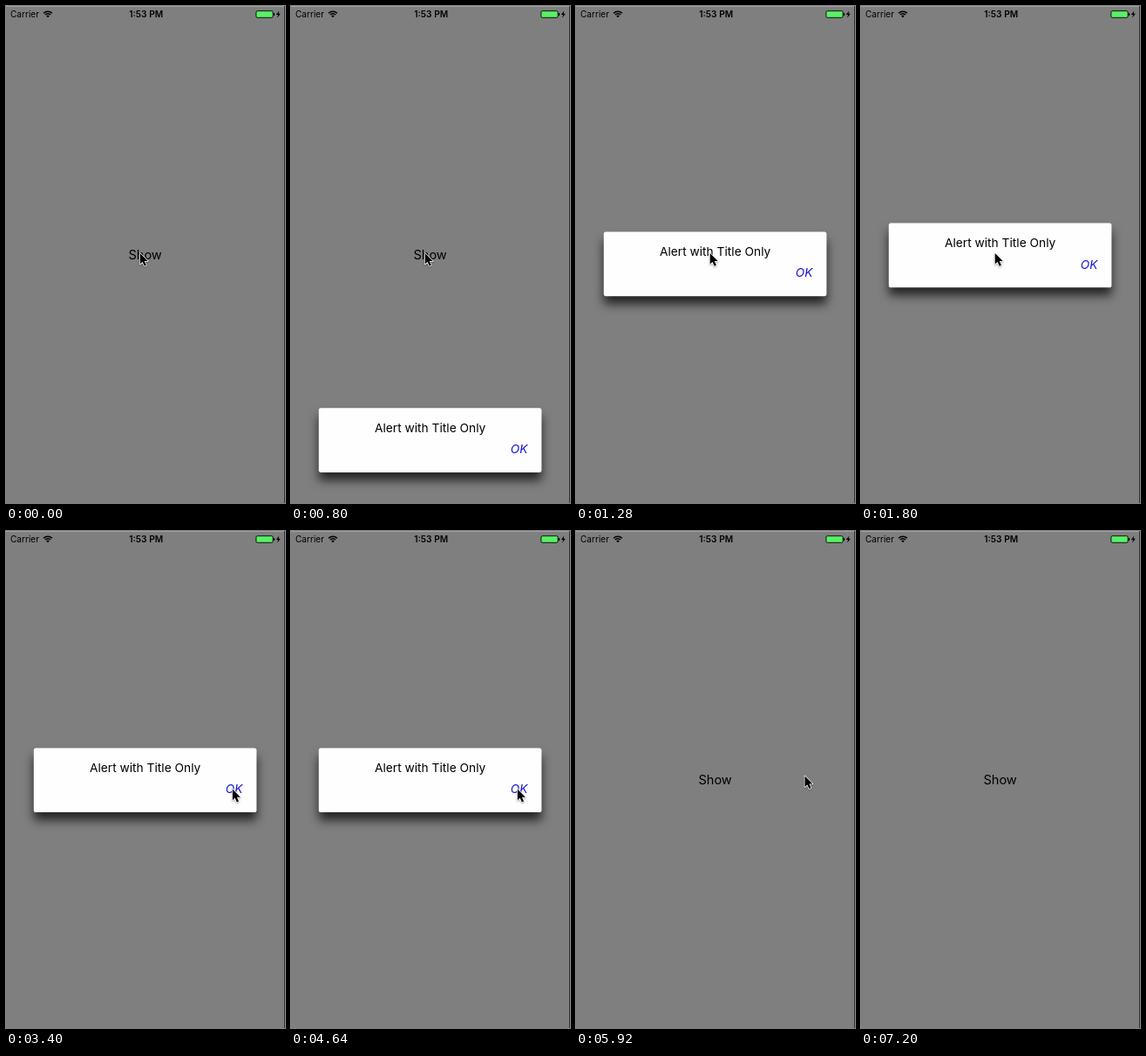
Recreate the animation shown at these times as an HTML page with a canvas. Size 320x569 px, loop 7.88 s.

```html
<!DOCTYPE html>
<html lang="en">
<head>
<meta charset="utf-8">
<title>Alert with Title Only</title>
<style>
  html, body { margin: 0; width: 100%; height: 100%; overflow: hidden; background: #7f7f7f; }
  canvas { display: block; width: 320px; height: 569px; }
</style>
</head>
<body>
<canvas id="stage"></canvas>
<script>
const W = 320, H = 569, LOOP = 7880, TICK = 40;
const canvas = document.getElementById('stage');
const ratio = window.devicePixelRatio || 1;
canvas.width = W * ratio;
canvas.height = H * ratio;
const ctx = canvas.getContext('2d');
ctx.scale(ratio, ratio);

const REST_Y = 248.4;
const clamp = v => Math.min(1, Math.max(0, v));
const progress = (t, from, to) => clamp((t - from) / (to - from));
const smooth = p => p * p * (3 - 2 * p);
const mix = (a, b, p) => a + (b - a) * p;

function text(str, x, y, font, color = '#000', align = 'center') {
  ctx.font = `${font} Inter, sans-serif`;
  ctx.textAlign = align;
  ctx.fillStyle = color;
  ctx.fillText(str, x, y);
}

function polygon(points) {
  ctx.beginPath();
  points.forEach(([x, y]) => ctx.lineTo(x, y));
  ctx.closePath();
}

function roundRect(x, y, w, h, r) {
  ctx.beginPath();
  ctx.roundRect(x, y, w, h, r);
}

function drawStatusBar() {
  text('Carrier', 5, 13.3, '400 10.1px', '#000', 'left');
  text('1:53 PM', 160.7, 13.3, '600 10.2px');

  // Wi-Fi
  ctx.strokeStyle = ctx.fillStyle = '#000';
  ctx.lineWidth = 1.5;
  for (const r of [7, 4.5]) {
    ctx.beginPath();
    ctx.arc(48, 13.2, r, -Math.PI * 0.75, -Math.PI * 0.25);
    ctx.stroke();
  }
  ctx.beginPath();
  ctx.moveTo(48, 13.2);
  ctx.arc(48, 13.2, 2.5, -Math.PI * 0.75, -Math.PI * 0.25);
  ctx.fill();

  // Battery
  ctx.lineWidth = 0.9;
  roundRect(286.9, 5.7, 19.2, 7.6, 1.4);
  ctx.fillStyle = '#5bef67';
  ctx.fill();
  ctx.stroke();
  ctx.fillStyle = '#000';
  roundRect(306.8, 8, 1.3, 3, 0.6);
  ctx.fill();
  polygon([[313.3, 5.5], [309.8, 10], [312, 10], [311.2, 13.4], [314.8, 8.7], [312.6, 8.7]]);
  ctx.fill();
}

function drawAlert(y) {
  ctx.save();
  ctx.shadowColor = 'rgba(0,0,0,0.72)';
  ctx.shadowBlur = 12 * ratio;
  ctx.shadowOffsetY = 9 * ratio;
  ctx.fillStyle = '#fefefe';
  roundRect(31.8, y, 255.6, 73.7, 2.6);
  ctx.fill();
  ctx.restore();
  text('Alert with Title Only', 159.6, y + 27.6, '400 13.75px');
  text('OK', 261.5, y + 52, 'italic 400 13.6px', '#1414d2');
}

function drawCursor({ x, y }) {
  ctx.save();
  ctx.translate(x, y);
  polygon([[0, 0], [0, 12.6], [2.9, 9.9], [5, 14.8], [7.2, 13.8], [5.1, 9.1], [9, 9.1]]);
  ctx.lineJoin = 'round';
  ctx.lineWidth = 1.5;
  ctx.strokeStyle = '#fff';
  ctx.shadowColor = 'rgba(0,0,0,0.35)';
  ctx.shadowBlur = 2 * ratio;
  ctx.shadowOffsetY = ratio;
  ctx.stroke();
  ctx.shadowColor = 'transparent';
  ctx.fillStyle = '#000';
  ctx.fill();
  ctx.restore();
}

function drawClickRing({ x, y }) {
  ctx.beginPath();
  ctx.arc(x + 0.4, y + 1, 18.3, 0, Math.PI * 2);
  ctx.lineWidth = 1.6;
  ctx.strokeStyle = '#111';
  ctx.stroke();
}

// Critically damped rise, then an accelerating drop.
function alertY(t) {
  if (t < 720 || t >= 5080) return null;
  if (t < 4800) {
    const x = 8.37 * (t - 626) / 1000;
    return REST_Y + 370 * (1 + x) * Math.exp(-x);
  }
  const s = (t - 4760) / 1000;
  return REST_Y + 3315 * s * s;
}

function cursorAt(t) {
  if (t >= 6160) return null;
  const across = smooth(progress(t, 2160, 2960));
  const settle = smooth(progress(t, 2960, 3400));
  const leave = progress(t, 5880, 6120) ** 1.6;
  return {
    x: mix(mix(mix(153.7, 251, across), 259.8, settle), 306, leave),
    y: mix(mix(mix(283, 282, across), 295.6, settle), 30, leave)
  };
}

function draw(t) {
  ctx.fillStyle = '#7f7f7f';
  ctx.fillRect(0, 0, W, H);
  ctx.fillStyle = '#a2a2a2';
  ctx.fillRect(0, 0, W, 1);
  ctx.fillStyle = '#333';
  ctx.fillRect(W - 1, 0, 1, H);

  drawStatusBar();
  text('Show', 159.6, 290.2, '400 14.6px');

  const y = alertY(t);
  if (y !== null) drawAlert(y);

  const cursor = cursorAt(t);
  if (!cursor) return;
  const pressed = (t >= 240 && t < 440) || (t >= 4520 && t < 4640);
  if (pressed) drawClickRing(cursor);
  drawCursor(cursor);
}

const start = performance.now();
function loop() {
  const t = (performance.now() - start) % LOOP;
  draw(Math.floor(t / TICK) * TICK);
  requestAnimationFrame(loop);
}
draw(0);
requestAnimationFrame(loop);
</script>
</body>
</html>
```
